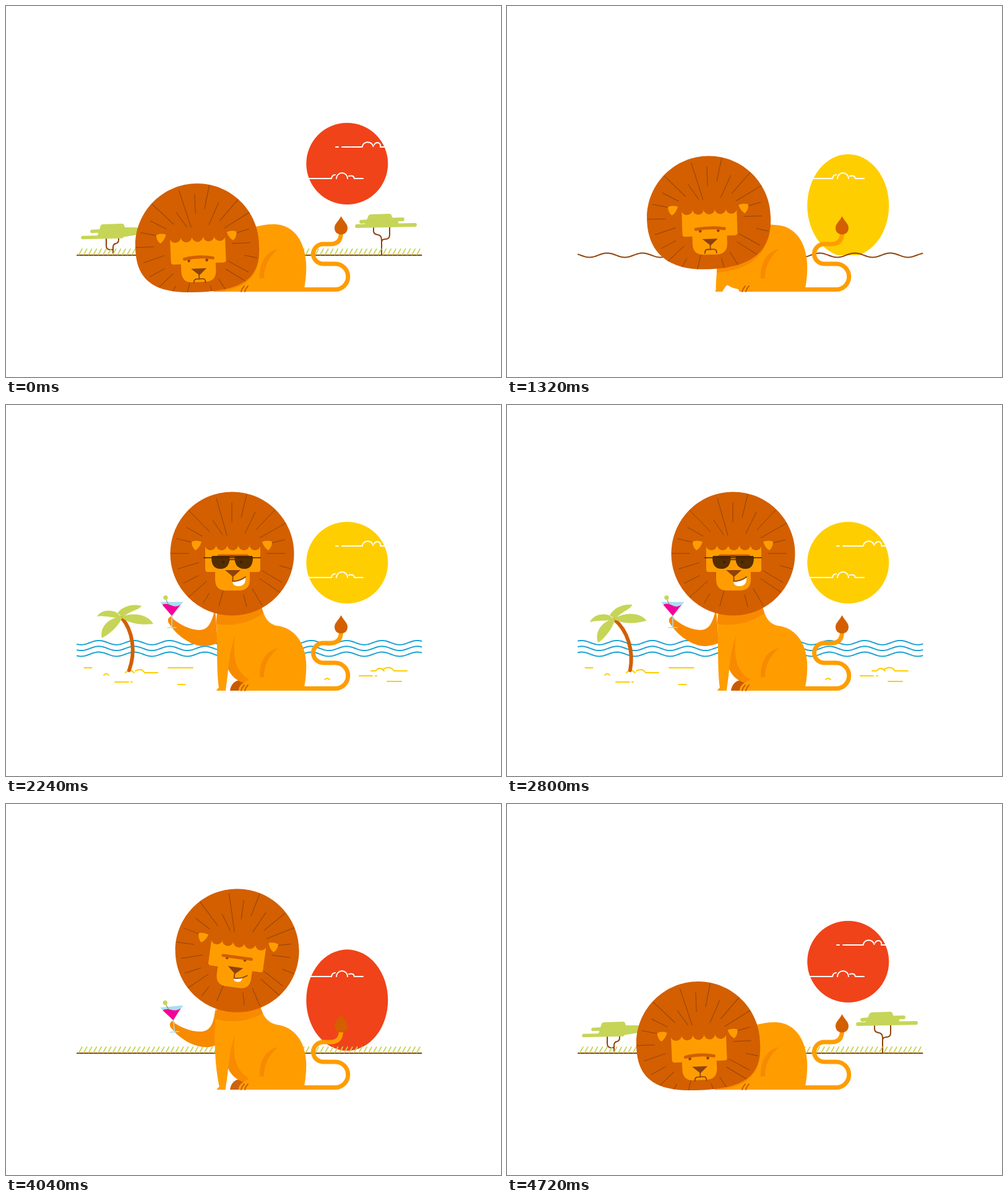
An HTML page with a canvas that plays this animation: 800 by 600 pixels, repeating every 4.76 s.

```html
<!DOCTYPE html>
<html lang="en">
<head>
<meta charset="utf-8">
<title>Lion on holiday</title>
<style>
html, body { margin: 0; width: 100%; height: 100%; overflow: hidden; background: #fff; }
canvas { display: block; }
</style>
</head>
<body>
<canvas id="stage" width="800" height="600"></canvas>
<script>
const ctx = document.getElementById('stage').getContext('2d');
const LOOP = 4760;
const ORANGE = '#ff9d00', SHADE = '#f88a00', MANE = '#d35f00', BROWN = '#8f420c',
  GREEN = '#c6d557', YELLOW = '#ffce00', RED = '#f0431a', GLASS = '#a9def2';
let t = 0;

const lerp = (a, b, u) => a + (b - a) * u;
const ramp = (from, to) => Math.min(1, Math.max(0, (t - from) / (to - from)));
const ease = (from, to) => { const u = ramp(from, to); return u * u * (3 - 2 * u); };
const easeOut = (from, to) => 1 - (1 - ramp(from, to)) ** 2;
// Blends two paths that share the same commands.
const morph = (a, b, u) => {
  const target = b.match(/-?[\d.]+/g);
  let i = 0;
  return a.replace(/-?[\d.]+/g, n => lerp(+n, +target[i++], u).toFixed(2));
};
const fill = (d, color) => { ctx.fillStyle = color; ctx.fill(new Path2D(d)); };
const stroke = (d, color, width = 2) => {
  ctx.strokeStyle = color;
  ctx.lineWidth = width;
  ctx.stroke(new Path2D(d));
};
const disc = (x, y, rx, ry, color) => {
  ctx.fillStyle = color;
  ctx.beginPath();
  ctx.ellipse(x, y, rx, ry, 0, 0, 7);
  ctx.fill();
};
const within = draw => { ctx.save(); draw(); ctx.restore(); };
// Turns and scales a drawing about a fixed point.
const pivot = (x, y, degrees, sx, sy, draw) => {
  if (sx < 0.01 || sy < 0.01) return;
  within(() => {
    ctx.translate(x, y);
    ctx.rotate(degrees * Math.PI / 180);
    ctx.scale(sx, sy);
    ctx.translate(-x, -y);
    draw();
  });
};

function drawSun() {
  const dip = ramp(730, 1090) - ramp(1090, 1570) + ramp(3440, 3800) - ramp(3800, 4280);
  within(() => {
    ctx.beginPath();
    ctx.rect(0, 0, 800, 403);
    ctx.clip();
    disc(551.3, 255 + 269 * dip ** 2.1, 66, 66 + 52 * dip ** 1.7,
      t >= 1090 && t < 3800 ? YELLOW : RED);
  });
  stroke('M533 228h4M543 228H575.5A9.2 9.2 0 0 1 593.5 227M595 224.5A5 5 0 0 1 605 228H618' +
    'M485 279H526Q527 273 532 273M534 279A9 9 0 0 1 552 279M554 275Q562 273 563 279H577', '#fff');
}

function drawTrees() {
  const gone = ease(520, 840);
  const left = 1 - gone + ease(4200, 4680), right = 1 - gone + ease(4140, 4600);
  pivot(173, 403, 0, left, left, () => {
    stroke('M173 403V390Q173 385 178 384Q182 383 182 378V374M162 374V387Q162 394 168 394H173', BROWN);
    fill('M147 374L153 355Q154 353 157 353L188 352Q191 352 192 358H212V370L187 374Z', GREEN);
    stroke('M124 374.5L187 373M139 364.5L211 361', GREEN, 5.5);
  });
  pivot(607, 403, 0, right, right, () => {
    stroke('M607 403V378Q607 371 601 370Q594 369 594 364V358M620 358V370Q620 377 613 377Q607 377 607 382', BROWN);
    fill('M578 357L586 339Q587 337 590 337L620 336Q623 336 624 342L634 348V356Z', GREEN);
    stroke('M567 356L661 354M574 349L600 347M600 346L641 345', GREEN, 5.8);
  });
}

function drawWave(y, spread, amp, color) {
  if (spread < 0.01) return;
  ctx.beginPath();
  for (let x = 393.5 - 278.5 * spread; x <= 393.5 + 278.5 * spread; x += 1.5)
    ctx.lineTo(x, y - amp * Math.cos(2 * Math.PI * ((x - 150) / 57.2 - (t - 2240) / 1160)));
  ctx.strokeStyle = color;
  ctx.lineWidth = 2;
  ctx.stroke();
}

function drawHorizon() {
  const amp = 3.4 * (ease(860, 1320) - ease(3480, 3800));
  const blue = ease(1300, 1760) - ease(3480, 3760);
  const color = `rgb(${[[143, 26], [66, 163], [12, 214]].map(([a, b]) => lerp(a, b, blue)).join()})`;
  const away = ease(3460, 3760);
  drawWave(384.3, easeOut(1300, 1740) - away, amp, color);
  drawWave(393.7, easeOut(1320, 1780) - away, amp, color);
  drawWave(403, 1, amp, color);

  const tall = 9 * (1 - ease(580, 880) + ease(3820, 4000));
  if (tall > 0.1) {
    let blades = '';
    for (let x = 118; x < 668; x += 7.8)
      blades += `M${x} 402L${x + tall * 0.55} ${402 - tall}`;
    stroke(blades, GREEN, 1.8);
  }
}

const SAND = [
  [132.5, 425, 'M-6 0h12'], [162, 437, 'M-4 0q4 -5 8 0'], [190, 448, 'M-14 0H8M12 0h2'],
  [219, 433, 'M-26 0q7 -8 14 0M-10 -3q10 -5 15 3H26'], [282, 425, 'M-20 0h40'],
  [283.5, 452, 'M-6 0h12'], [519, 444, 'M-4 0q4 -4 8 0'], [585, 438, 'M-14 0H7M12 0h2'],
  [619, 430, 'M-29 0h7q7 -8 14 0M-9 -3q11 -6 17 3H29'], [628, 447, 'M-12 0h23']
];
function drawBeach() {
  const size = ease(1320, 1620) - ease(3500, 3760);
  for (const [x, y, d] of SAND)
    pivot(x, y, 0, size, 1, () => { ctx.translate(x, y); stroke(d, YELLOW); });

  const grown = easeOut(1620, 1860) - ease(3460, 3740);
  const sway = -40 + 40 * ease(1680, 2240) - 19 * ease(2240, 3400) - 20 * ease(3440, 3740);
  pivot(199, 429, sway, grown, grown, () => {
    stroke('M199 429C210 399 205 365 187 344', MANE, 6);
    fill('M188 344C178 329 155 329 147 342C160 340 172 345 188 344Z' +
      'M189 342C165 343 151 360 155 377C170 369 182 357 189 342Z' +
      'M186 343C205 334 230 339 238 354C222 356 200 355 186 343Z' +
      'M180 337C188 325 205 321 219 325C213 333 201 332 188 344Z', GREEN);
  });
}

function drawArm(sit, lean) {
  const size = ease(1380, 1600) - ease(4060, 4340);
  within(() => {
    ctx.translate(0, (1 - sit) * 80);
    pivot(340, 322, -6 * lean, size, size, () => {
      fill('M338 328C333 350 328 364 312 364C295 363 280 354 270 346Q269 341 266 342' +
        'C262 344 260 349 264 354C275 372 300 391 322 390Q333 389 342 385Z', SHADE);
      stroke('M268 340V360M261 360H275', GLASS, 1.6);
      fill('M249 318.5H286.5L268 341Z', GLASS);
      const slosh = 1.5 * Math.sin(t / 180);
      fill(`M252.5 323Q259 ${320 - slosh} 267 324T282 323L268 341Z`, '#f4009a');
      stroke('M258 313L263 324', '#788b35', 1);
      disc(257.9, 311.5, 3.6, 3.6, GREEN);
    });
  });
}

const BODY_LIE = 'M342 440L340 445C338 450 336 455 335 460L335 461L335 462L345 462' +
  'C350 462 352 462 355 462C360 462 365 462 370 462C372 462 374 462 376 462L481 462' +
  'C484 448 486 430 485 415C482 372 458 352 432 353C420 353 410 355 400 358Z';
const BODY_SIT = 'M342 320L340 352C342 390 340 430 344 457L340 461L341 462L355 462' +
  'C358 440 359 430 359 427C364 438 372 446 384 449C378 453 376 457 376 462L481 462' +
  'C484 448 486 430 485 415C482 375 458 359 438 357C425 354 418 346 413 326Z';
const BODY_LEAN = 'M341 320L338 352C336 390 339 430 345 457L341 461L341 462L355 462' +
  'C358 440 359 430 359 427C364 438 372 446 384 449C378 453 376 457 376 462L481 462' +
  'C484 448 486 430 485 415C482 375 458 359 438 357C425 354 416 346 411 326Z';
const MANE_LIE = 'M-100 0C-100 -55 -55 -100 0 -100C55 -100 100 -55 100 0' +
  'C103 53 76 76 -14 76C-79 76 -100 48 -100 0Z';
const MANE_SIT = 'M-100 0C-100 -55.2 -55.2 -100 0 -100C55.2 -100 100 -55.2 100 0' +
  'C100 55.2 55.2 100 0 100C-55.2 100 -100 55.2 -100 0Z';
const HAIRS = 'M340 151L357 211M365 158V189M389 145L380 182M334 186L350 210M296 171L329 205' +
  'M403 173L386 208M434 170L404 202M452 191L408 216M292 198L317 212M275 216L305 223' +
  'M266 240H295M278 265L311 255M287 288L311 276M295 311L324 285M319 320L328 305' +
  'M344 325L351 300M389 326L384 307M414 324L398 297M443 303L410 281M446 287L414 268' +
  'M461 265L442 260M451 240H422M450 218L425 224';

function drawBody(sit, lean, x, y, mane) {
  const body = morph(BODY_LIE, morph(BODY_SIT, BODY_LEAN, lean), sit);
  const upright = Math.max(0, sit * 3 - 2);
  within(() => {
    ctx.globalAlpha = upright;
    fill('M362 462C363 452 370 445 379 445L396 448L378 462Z', '#c95a00');
  });
  fill(body, ORANGE);
  within(() => {
    ctx.clip(new Path2D(body));
    within(() => {
      ctx.translate(x + lerp(0, -8, sit), y + lerp(3, 15, sit));
      fill(mane, SHADE);
    });
    ctx.globalAlpha = upright;
    fill('M370 372Q361 400 359 427C364 438 372 446 384 449L393 444C371 430 366 410 370 372Z', SHADE);
  });
  fill('M440 393C420 397 409 415 410 441L417 440Q417 412 440 393Z', SHADE);
  stroke('M380 462Q381 457 385 453M386 462Q387 457 391 453', '#c95a00', 1.8);
}

function drawFace(sit, lean, glasses) {
  fill('M322 226H411V266Q411 270 407 270H394V282Q394 300 376 300H356Q338 300 338 282V270H326Q322 270 322 266Z', ORANGE);
  for (let i = -2; i <= 2; i++) disc(366.5 + i * 18, 226, 9.2, 9, MANE);
  ctx.fillStyle = MANE;
  ctx.fillRect(321, 215, 91, 11);
  fill('M300 221Q307 218 316 221Q313 231 306 235Q300 230 300 221Z' +
    'M430 221Q423 218 414 221Q417 231 424 235Q430 230 430 221Z', ORANGE);

  within(() => {
    ctx.translate(0, 11 * (1 - sit));
    const brow = 251 - 7 * glasses, arch = 5 * (1 - sit);
    disc(351, 254, 2.3, 2.3, BROWN);
    disc(380, 254, 2.3, 2.3, BROWN);
    stroke(`M344 ${brow}Q367 ${brow - arch} 390 ${brow}`, MANE, 5);
    fill('M354 267H379L367 278Z', BROWN);
    stroke('M366.5 276V284', BROWN, 1.8);
    if (sit < 0.5) {
      stroke('M357.5 290Q357.5 284 362 284H372Q376.5 284 376.5 290', BROWN, 1.8);
    } else {
      const grin = lerp(1, 0.65, lean);
      pivot(366, 285, 0, grin, grin, () =>
        fill('M366 286Q378 286 387 279Q388 293 375 293Q367 293 366 286Z', '#fff'));
      stroke('M366.5 285Q378 285 387 278', BROWN, 1.8);
    }
  });

  pivot(366, 250, 0, glasses, glasses, () => {
    const lens = 'M333 244H361Q363 252 358 260Q354 265 347 265Q332 265 332 247Z' +
      'M370 244H398L399 247Q399 265 385 265Q378 265 373 260Q368 252 370 244Z';
    fill(lens, 'rgba(55,27,0,.85)');
    stroke('M320 247H411M361 244.5H370M361 250H370', '#4a2500', 1.7);
  });
}

function drawLion() {
  const fall = ease(4000, 4520);
  const sit = ease(1160, 1600) - fall;
  const lean = ease(3560, 3880) * (1 - fall);
  const glasses = ease(1440, 1640) - ease(3480, 3720);
  const hop = 7 * Math.sin(Math.PI * ramp(4480, 4680));
  const x = 309 + 56.5 * sit + 9.3 * lean;
  const y = 387 - 146.5 * sit - 6 * lean - hop;
  const mane = morph(MANE_LIE, MANE_SIT, sit);

  stroke('M474 458.5H532A20.75 20.75 0 0 0 532 417H512.5A16 16 0 0 1 512.5 385H525Q541.5 385 541.5 366', ORANGE, 7);
  fill('M541.5 340C546 349 552 352 552 359C552 366 547 369.5 541.5 369.5' +
    'C536 369.5 531 366 531 359C531 352 537 349 541.5 340Z', MANE);
  drawArm(sit, lean);
  drawBody(sit, lean, x, y, mane);

  within(() => {
    ctx.translate(x, y);
    fill(mane, MANE);
    ctx.clip(new Path2D(mane));
    ctx.rotate((8 * lean - 2.5 * (1 - sit)) * Math.PI / 180);
    ctx.translate(-365.5, -240.5);
    stroke(HAIRS, BROWN, 1);
    drawFace(sit, lean, glasses);
  });
}

function frame(now) {
  t = now % LOOP;
  ctx.fillStyle = '#fff';
  ctx.fillRect(0, 0, 800, 600);
  ctx.lineCap = ctx.lineJoin = 'round';
  drawSun();
  drawTrees();
  drawHorizon();
  drawBeach();
  drawLion();
  requestAnimationFrame(frame);
}
requestAnimationFrame(frame);
</script>
</body>
</html>
```
